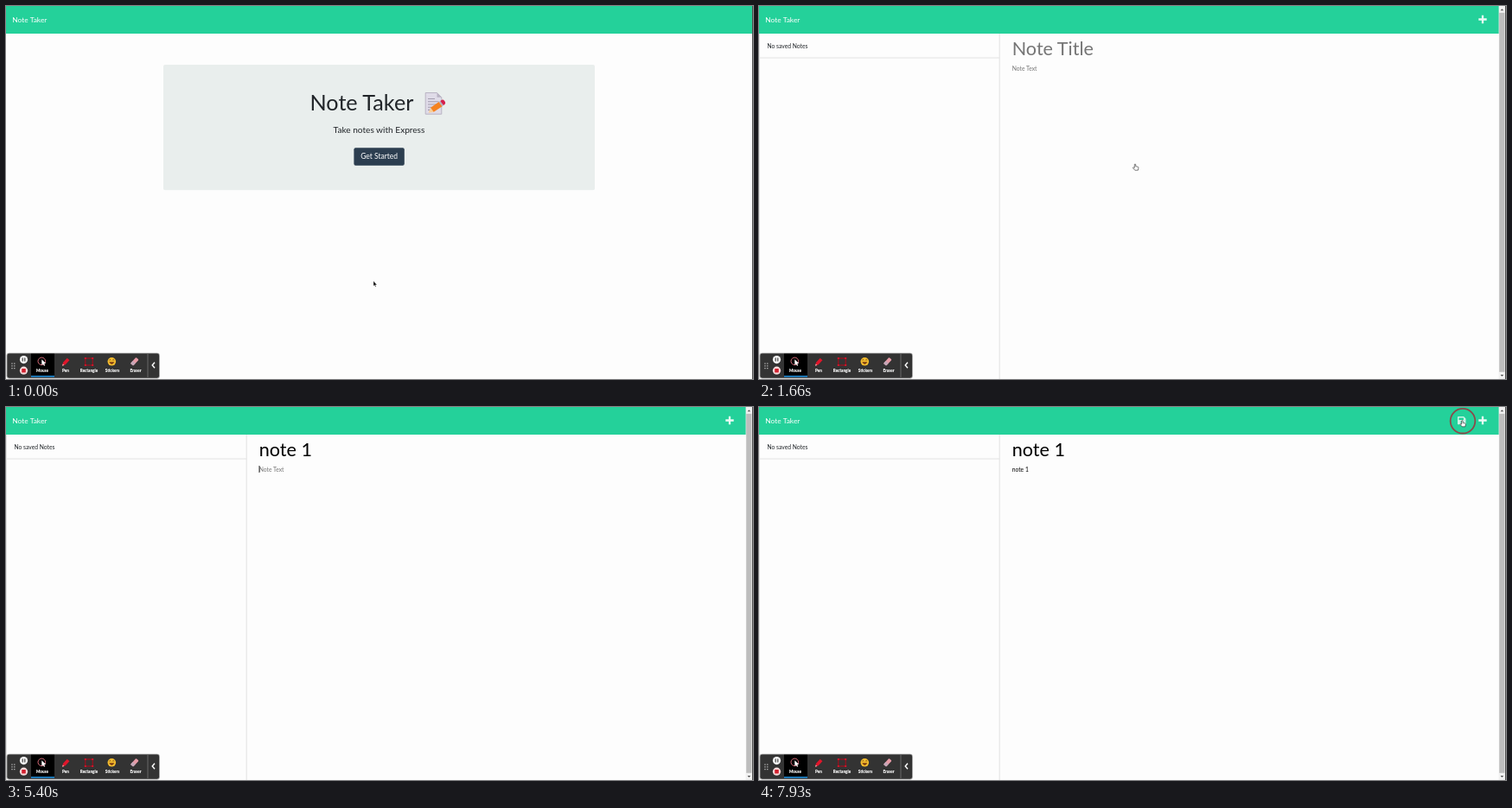
An HTML page that plays this animation: 864x432 px, repeating every 8 s.

```html
<!DOCTYPE html>
<html lang="en">
<head>
<meta charset="utf-8">
<title>Note Taker</title>
<style>
html, body { margin: 0; width: 100%; height: 100%; overflow: hidden; background: #fdfdfd; }
svg { display: block; width: 864px; height: 432px; }
text { font-family: Lato, sans-serif; white-space: pre; }
.brand { font-size: 8.44px; fill: #fff; }
.big { font-size: 25.2px; }
.title { font-size: 21.6px; }
.body { font-size: 6.75px; }
.tool { font-size: 4.6px; font-weight: 900; fill: #fff; text-anchor: middle; }
.hint { fill: #757575; }
</style>
</head>
<body>
<svg viewBox="0 0 864 432">
  <rect width="864" height="432" fill="#fdfdfd"/>
  <rect width="863" height="32" fill="#24d19a"/>
  <text class="brand" x="7.3" y="18.8">Note Taker</text>

  <g id="home">
    <rect x="182" y="68" width="499" height="145.3" rx="2" fill="#e9eeed"/>
    <text class="big" x="351.5" y="121" fill="#212529">Note Taker</text>
    <g>
      <path d="M485.2 100.5h13.3l5.3 5.3v19.4h-18.6z" fill="#dfdbe8" stroke="#b5afc0" stroke-width=".9"/>
      <path d="M498.5 100.5v5.3h5.3z" fill="#b9b3c4"/>
      <path d="M488 107.5h8M488 110.8h12.5M488 114h10M488 117.2h6M488 120.4h3" stroke="#a39dae" stroke-width="1.1"/>
      <path d="M488.6 123.8l2.5-6 3.6 5z" fill="#f7cf9c"/>
      <path d="M491.1 117.8l9.6-6.8 3.8 5.2-9.8 6.6z" fill="#f58220"/>
      <path d="M500.7 111l1.6-1.1 3.7 5.2-1.5 1.1z" fill="#b4acbd"/>
      <path d="M502.3 109.9l1.8-1.2q1.6-.7 2.9 1l.9 1.4q.8 1.7-.5 2.9l-1.4 1.1z" fill="#d61f4b"/>
    </g>
    <text x="431.5" y="147.3" font-size="10.1" text-anchor="middle" fill="#212529">Take notes with Express</text>
    <rect id="focus" x="401.4" y="163.3" width="60.2" height="22.4" rx="2.8" fill="#95a0a6"/>
    <rect id="button" x="402.4" y="164.3" width="58.4" height="20.4" rx="2"/>
    <text x="431.6" y="177.4" font-size="8.5" text-anchor="middle" fill="#fff">Get Started</text>
  </g>

  <g id="notes">
    <path d="M.5 32V432M278.2 32V432M1 60H278" stroke="#dfdfdf" stroke-width=".9"/>
    <text class="body" x="9.5" y="48.5" fill="#212529">No saved Notes</text>
    <text id="title" class="title" x="292.7" y="56.8"></text>
    <text id="text" class="body" x="292.7" y="74.5"></text>
    <rect id="caret" width=".8"/>
    <path d="M837 10.8v9.4M832.3 15.5h9.4" stroke="#eafaf5" stroke-width="2.3"/>
    <path id="save" fill="#eafaf5" fill-rule="evenodd" d="M808.8 11h6.3l2.4 2.4v6q0 .8-.8.8h-7.9q-.8 0-.8-.8v-7.6q0-.8.8-.8zM809.5 12.4v2.5h5.4v-2.5zM812.7 16.2a1.3 1.3 0 1 0 .01 0z"/>
    <rect x="855.6" width="7.6" height="432" fill="#f1f1f1"/>
    <rect x="856.2" y="7.8" width="6.2" height="416" fill="#bdbdbd"/>
    <path d="M857.6 5.2l1.8-2 1.8 2zM857.6 427l1.8 2 1.8-2z" fill="#505050"/>
  </g>
  <rect x="863.2" width=".8" height="432" fill="#222"/>

  <g id="toolbar">
    <rect x=".6" y="401.8" width="177.2" height="29.6" rx="3" fill="#a5a5a5"/>
    <rect x="1.4" y="402.5" width="175.7" height="28.2" rx="2.4" fill="#333"/>
    <path d="M7 413.5v7M9.8 413.5v7" stroke="#ccc" stroke-width="1.2" stroke-dasharray="1.2 1.6"/>
    <circle cx="20.5" cy="409.6" r="4.6" fill="#f4f4f4"/>
    <path d="M19.2 407.6v4M21.8 407.6v4" stroke="#333" stroke-width="1.1"/>
    <circle cx="20.5" cy="422.2" r="4.6" fill="#f4dada"/>
    <rect x="18.2" y="419.9" width="4.6" height="4.6" rx=".6" fill="#d3202f"/>
    <rect x="29" y="402.7" width="27" height="26" fill="#000"/>
    <rect x="29" y="428.2" width="27" height="1.5" fill="#1a8fe0"/>
    <circle cx="41.3" cy="411.4" r="4.3" fill="none" stroke="#d76b78" stroke-width="1"/>
    <path d="M41.3 409.3v6.6l1.6-1.4 1.1 2.3 1.2-.6-1.1-2.2h2z" fill="#fff"/>
    <path d="M65 416.8l1.1-4 4.6-5 2.7 2.5-4.6 5z" fill="#e0162b"/>
    <path d="M65 416.8l.7-2.4 1.6 1.5z" fill="#f6b3b3"/>
    <rect x="91.8" y="408" width="8.4" height="8" fill="none" stroke="#a50d1c" stroke-width="1.1"/>
    <path d="M90.8 408h2M99.2 408h2M90.8 416h2M99.2 416h2" stroke="#d0142a" stroke-width="2"/>
    <circle cx="122.3" cy="411.8" r="4.8" fill="#f5bd2e"/>
    <path d="M119.2 412.2q3.1 5.6 6.2 0z" fill="#7a3b12"/>
    <path d="M119.4 410.3q1-1.4 2 0M123.2 410.3q1-1.4 2 0" fill="none" stroke="#5b3310" stroke-width=".8"/>
    <path d="M144.6 413.3l5.2-5.8q.6-.6 1.3 0l1.8 1.6q.6.6 0 1.3l-5.2 5.6q-.7.6-1.3 0l-1.8-1.5q-.6-.5 0-1.2z" fill="#e79aa6"/>
    <path d="M144.6 413.3l2-2.2 3.2 2.7-2.1 2.2q-.7.6-1.3 0l-1.8-1.5q-.6-.5 0-1.2z" fill="#c4a7b8"/>
    <path d="M164 403v27" stroke="#777" stroke-width=".8"/>
    <path d="M172 412.8l-2.8 3.2 2.8 3.2" fill="none" stroke="#fff" stroke-width="1.4"/>
    <text class="tool" x="42" y="423.6">Mouse</text>
    <text class="tool" x="69" y="423.6">Pen</text>
    <text class="tool" x="96" y="423.6">Rectangle</text>
    <text class="tool" x="123" y="423.6">Stickers</text>
    <text class="tool" x="150" y="423.6">Eraser</text>
  </g>

  <circle id="ring" r="14.3" fill="none" stroke="#b3162c" stroke-opacity=".72" stroke-width="1.8"/>
  <g id="pointer">
    <path id="arrow" d="M0 0v5.8l1.3-1.1.9 2 .9-.4-.9-1.9h1.8z" fill="#111" stroke="#fff" stroke-width=".3"/>
    <path id="hand" d="M-.7 .4q.7-.8 1.4 0v2.3l2.4.5q.9.3.8 1.2l-.5 2.8h-3.6l-2.4-2.7q.2-1 1.2-.5l.7.5z" fill="#fff" stroke="#222" stroke-width=".6"/>
    <path id="beam" d="M-1.4-3h1l.4.4.4-.4h1M0-2.6v5.2M-1.4 3h1l.4-.4.4.4h1" fill="none" stroke="#222" stroke-width=".8"/>
  </g>
</svg>
<script>
const LOOP = 8000, STEP = 200 / 3;
const el = {};
document.querySelectorAll('[id]').forEach(e => el[e.id] = e);
const show = (name, on) => el[name].style.display = on ? '' : 'none';
const set = (name, attrs) => { for (const k in attrs) el[name].setAttribute(k, attrs[k]); };
const within = (t, ...spans) => spans.some(([a, b]) => t >= a && t < b);

// pointer moves: start, end, from x, y, to x, y
const moves = [
  [0, 533, 425, 318.5, 434.6, 179],
  [1660, 1661, 435, 180, 435, 183],
  [2330, 2466, 435, 183, 433, 180],
  [2666, 3000, 433, 180, 336, 52],
  [7000, 7800, 354, 47, 813.4, 15.6]
];
const clicks = [[1330, 1530], [3000, 3200], [7860, 8000]];
const titleKeys = [[4860, 'n'], [4930, 'no'], [5000, 'note'], [5060, 'note '], [5130, 'note 1']];
const textKeys = [[5800, 'n'], [5870, 'no'], [5930, 'not'], [6000, 'note'], [6060, 'note '], [6200, 'note 1']];

function pointerAt(t) {
  const [a, b, x0, y0, x1, y1] = moves.filter(m => m[0] <= t).pop();
  const p = Math.min(1, (t - a) / (b - a)), e = p * p * (3 - 2 * p);
  return [x0 + (x1 - x0) * e, y0 + (y1 - y0) * e];
}

function typed(name, keys, hint, t) {
  const last = keys.filter(k => k[0] <= t).pop();
  const value = last ? last[1] : '';
  el[name].textContent = value || hint;
  el[name].classList.toggle('hint', !value);
  return value ? el[name].getComputedTextLength() : 0;
}

function draw(t) {
  const home = t < 1660;
  const [x, y] = pointerAt(t);
  show('home', home);
  show('notes', !home);

  const over = home && y < 185;
  set('button', { fill: over ? '#1e2b37' : '#2c3e50' });
  show('focus', home && t >= 1330);

  const titleWidth = typed('title', titleKeys, 'Note Title', t);
  const textWidth = typed('text', textKeys, 'Note Text', t);
  const inText = t >= 5400;
  set('caret', inText ? { x: 292.6 + textWidth, y: 68, height: 8 }
                      : { x: 292.6 + titleWidth, y: 38, height: 22 });
  show('caret', within(t, [3000, 3530], [4060, 4600], [4860, 6730], [7260, 7790]));
  show('save', t >= 5800);

  const onSave = !home && y < 32 && x > 806;
  set('save', { opacity: onSave ? .85 : 1 });
  const kind = over || onSave || within(t, [1660, 1730]) ? 'hand'
    : home || y < 32 ? 'arrow' : 'beam';
  ['arrow', 'hand', 'beam'].forEach(k => show(k, k === kind));
  set('pointer', { transform: `translate(${x} ${y})` });
  show('pointer', !within(t, [4860, 7000]));
  set('ring', { cx: x + .6, cy: y + .6 });
  show('ring', within(t, ...clicks));
}

function tick(now) {
  draw(Math.floor((now % LOOP + 7) / STEP) * STEP % LOOP);
  requestAnimationFrame(tick);
}
draw(0);
requestAnimationFrame(tick);
</script>
</body>
</html>
```
